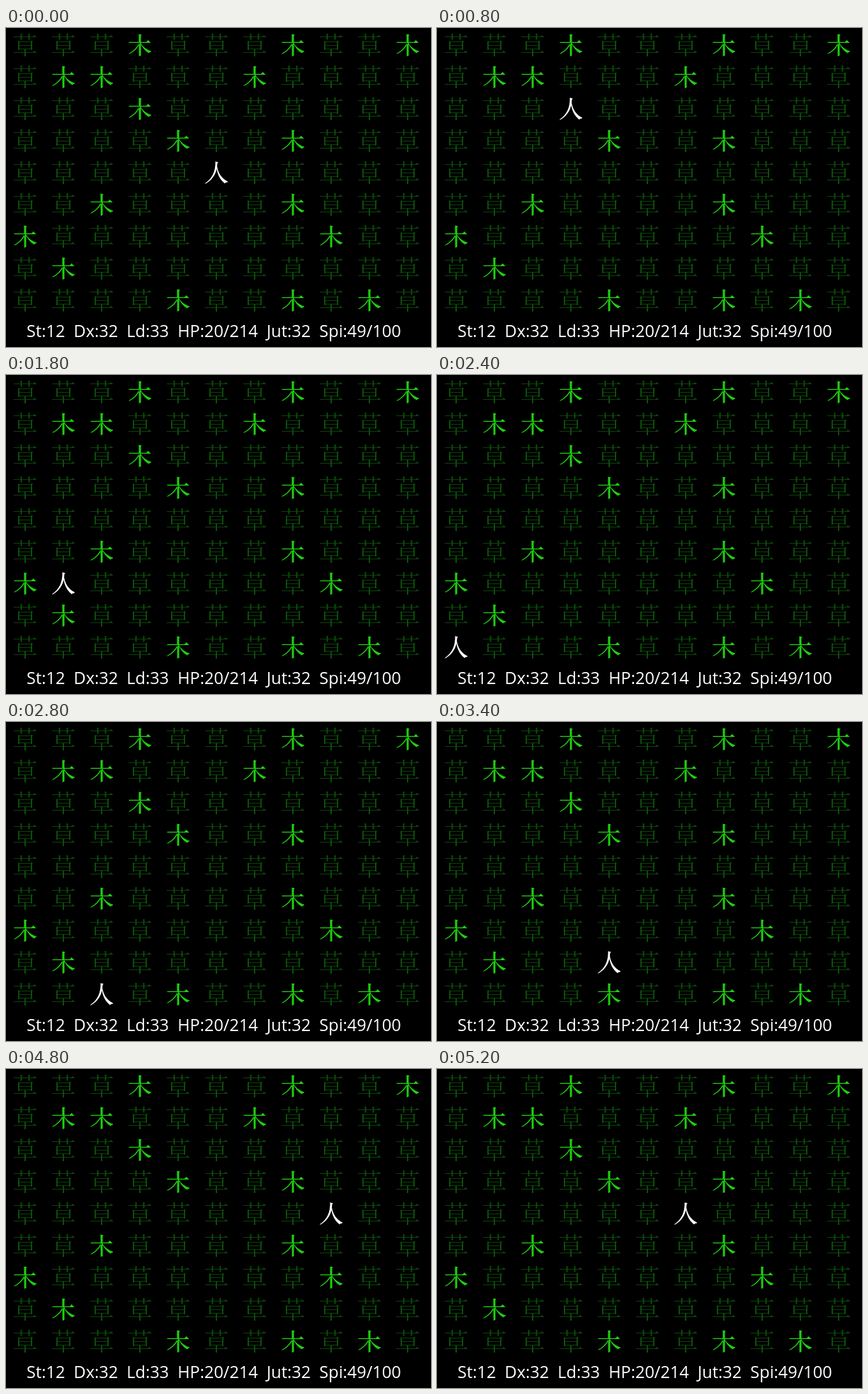
Write an HTML page with a canvas that moves like this. It is 600 by 450 pixels and loops after 5400 ms.

```html
<!DOCTYPE html>
<html lang="en">
<head>
<meta charset="utf-8">
<title>Field walk</title>
<style>
html, body { margin: 0; width: 100%; height: 100%; overflow: hidden; background: #000; }
canvas { display: block; }
</style>
</head>
<body>
<canvas id="stage" width="600" height="450"></canvas>
<script>
const ctx = document.getElementById('stage').getContext('2d');
const STEP = 200, LEFT = 11, TOP = 8, COL = 54, ROW = 45;

// T = tree, . = grass
const MAP = [
  '...T...T..T',
  '.TT...T....',
  '...T.......',
  '....T..T...',
  '...........',
  '..T....T...',
  'T.......T..',
  '.T.........',
  '....T..T.T.'
];

// Walk as moves: l, r, u, d, and z for down-left
const START = [5, 4];
const MOVES = 'lluulzdddlddrrrurrrrruuull';
const DIRS = { l: [-1, 0], r: [1, 0], u: [0, -1], d: [0, 1], z: [-1, 1] };
const route = [START];
for (const m of MOVES) {
  const [x, y] = route[route.length - 1];
  route.push([x + DIRS[m][0], y + DIRS[m][1]]);
}

const tree = new Path2D(
  'M.5 11.8H25L27.6 9L31.6 13.1H.5Z' +
  'M14.4 .4L18.7 1.5L17.5 3V31L14.7 32Z' +
  'M14.6 13C12 19 7 24.5 .3 28L.8 28.8C8 25.5 13 20.5 16.2 13Z' +
  'M17 13C20 18 25 22.5 32 24.6V25.4Q29.6 25.6 28.6 27.6C23 24 19 19 16.4 13Z');
const person = new Path2D(
  'M14.6 .2L18.7 1.4L17.4 3C17 14 13 25 .6 31.8L.1 31C10.5 24 14.8 14 14.6 .2Z' +
  'M17 7C18.2 16 23.5 24.5 32 28.6V29.4Q29 29.2 27.8 31.2C21 26 17.2 18 16.2 9Z');
const bars = new Path2D('M0 4.5H32M7 11.5H25M7 16.5H25M7 21.5H25M0 26.5H32');
const posts = new Path2D('M10.5 0V8.5M21.5 0V8.5M7 10.5V23M25 10.5V23M16 22V32');
const tips = new Path2D(
  'M26.5 4.5L29 2L32 4.5ZM23.5 11.5L25.2 9.6L27.6 11.5ZM26.5 26.5L29 24L32 26.5Z');

function line(path, color, width) {
  ctx.strokeStyle = color;
  ctx.lineWidth = width;
  ctx.stroke(path);
}

function fill(path, color) {
  ctx.fillStyle = color;
  ctx.fill(path);
}

function drawTile(kind, x, y) {
  ctx.save();
  ctx.translate(LEFT + x * COL, TOP + y * ROW);
  if (kind === 'P') fill(person, '#fff');
  else if (kind === 'T') fill(tree, '#1fd10f');
  else {
    line(bars, '#0a400a', 1);
    line(posts, '#0c4d0a', 2);
    fill(tips, '#0b460a');
  }
  ctx.restore();
}

function draw(time) {
  const [px, py] = route[Math.floor(time / STEP) % route.length];
  ctx.fillStyle = '#000';
  ctx.fillRect(0, 0, 600, 450);
  MAP.forEach((row, y) => [...row].forEach((kind, x) =>
    drawTile(x === px && y === py ? 'P' : kind, x, y)));
  ctx.fillStyle = '#fff';
  ctx.font = '23.5px "Open Sans", "Noto Sans", sans-serif';
  ctx.fillText('St:12  Dx:32  Ld:33  HP:20/214  Jut:32  Spi:49/100', 29, 436);
}

const begin = performance.now();
function tick() {
  draw(performance.now() - begin);
  requestAnimationFrame(tick);
}
tick();
</script>
</body>
</html>
```
